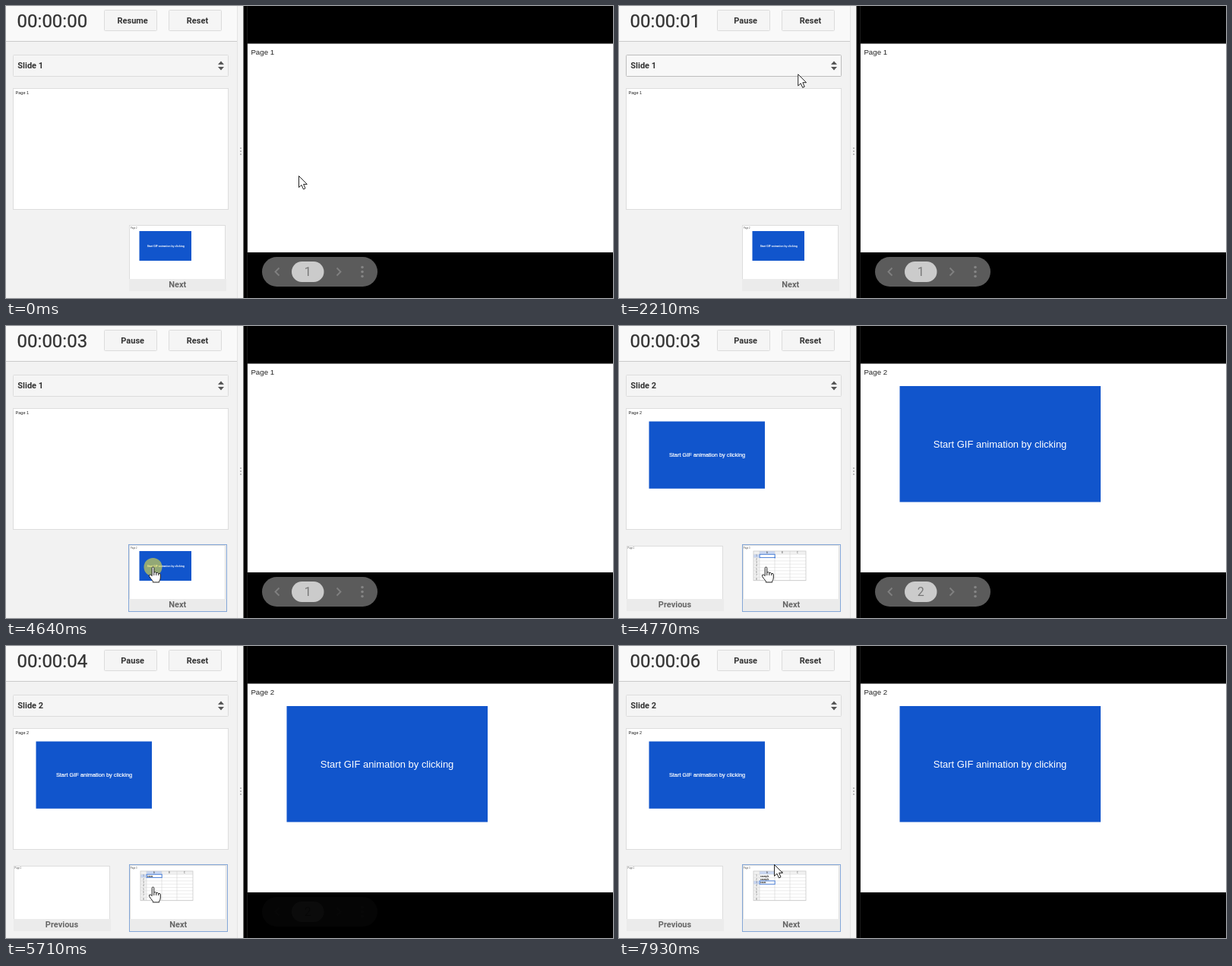
Recreate the animation shown at these times as an HTML page. Size 799 by 384 pixels, loop 8000 ms.

```html
<!DOCTYPE html>
<html lang="en">
<head>
<meta charset="utf-8">
<title>Presenter view</title>
<style>
  html, body { margin: 0; width: 100%; height: 100%; overflow: hidden; background: #000; }
  svg { display: block; width: 799px; height: 384px; }
  text { font-family: "Liberation Sans", Arial, sans-serif; fill: #222; white-space: pre; }
  .ui { font: bold 11px Roboto, sans-serif; fill: #333; }
  .mid { text-anchor: middle; }
  .foot { fill: #666; }
  .clock { font: 24px Roboto, sans-serif; fill: #333; stroke: #333; stroke-width: .25; }
  .box { fill: #f5f5f5; stroke: #dcdcdc; }
  .box.hover { fill: #f8f8f8; stroke: #bdbdbd; }
  .page { fill: #fff; stroke: #ddd; }
  .white { fill: #fff; }
  .tiny { font-size: 2.7px; fill: #444; }
</style>
</head>
<body>
<svg viewBox="0 0 799 384">
  <!-- presenter panel -->
  <rect width="313" height="384" fill="#f2f2f2"/>
  <rect width="305" height="46" fill="#f9f9f9"/>
  <rect y="46" width="305" height="1" fill="#cacaca"/>
  <rect x="305" width="7" height="384" fill="#f4f4f4"/>
  <rect x="304" width="1" height="384" fill="#e4e4e4"/>
  <g fill="#bbb">
    <rect x="308" y="186" width="2" height="2"/>
    <rect x="308" y="190" width="2" height="2"/>
    <rect x="308" y="194" width="2" height="2"/>
  </g>
  <text id="clock" class="clock" x="14.6" y="27.5">00:00:00</text>
  <rect id="toggle" class="box" x="129.5" y="5.5" width="69" height="27" rx="1"/>
  <text id="toggleText" class="ui mid" x="166.7" y="23">Resume</text>
  <rect class="box" x="214.5" y="5.5" width="69" height="27" rx="1"/>
  <text class="ui mid" x="252" y="23">Reset</text>
  <rect id="picker" class="box" x="9.5" y="64.5" width="283" height="28" rx="1"/>
  <text id="pickerText" class="ui" x="15.3" y="82">Slide 1</text>
  <path d="M279 77l4-4.5 4 4.5zM279 80l4 4.5 4-4.5z" fill="#555"/>

  <rect class="page" x="9.5" y="108.5" width="283" height="159"/>
  <text id="previewText" x="12.6" y="116.3" font-size="5.5">Page 1</text>

  <!-- thumbnails -->
  <g id="prev">
    <rect class="page" x="10.5" y="289.5" width="126" height="85" stroke="#e4e4e4"/>
    <rect x="10" y="359" width="128" height="16" fill="#ebebeb"/>
    <text class="tiny" x="11.6" y="292.6">Page 1</text>
    <text class="ui mid foot" x="73.5" y="370">Previous</text>
  </g>
  <g id="next">
    <rect class="page" x="162.5" y="288.5" width="126" height="86" stroke="#e4e4e4"/>
    <rect x="162" y="359" width="128" height="16" fill="#ebebeb"/>
    <rect id="nextEdge" x="161.5" y="287.5" width="129" height="88" fill="none" stroke="#84a7d8"/>
    <text class="ui mid foot" x="225.7" y="370">Next</text>
  </g>
  <text id="nextPage" class="tiny" x="164" y="292.6">Page 2</text>
  <g id="thumbCard">
    <rect x="175.5" y="296" width="68.5" height="39" fill="#1155cc"/>
    <text class="white mid" x="210.3" y="317" font-size="3.35" font-weight="bold" textLength="none">Start GIF animation by clicking</text>
  </g>
  <g id="sheet"></g>

  <!-- audience view -->
  <rect x="312.5" width="487" height="384" fill="#000"/>
  <rect x="317" width="1" height="384" fill="#1c1c1c"/>
  <rect x="318" y="49.5" width="481" height="274.5" fill="#fff"/>
  <text id="stageText" x="322.4" y="64" font-size="9.7">Page 1</text>

  <g id="cards">
    <rect x="39.5" y="125.5" width="152.5" height="88.3" fill="#1155cc"/>
    <text class="white mid" x="116" y="172" font-size="7.4" stroke="#fff" stroke-width=".2">Start GIF animation by clicking</text>
    <rect x="369.5" y="79" width="264.5" height="152.5" fill="#1155cc"/>
    <text class="white mid" x="501.6" y="160" font-size="12.95">Start GIF animation by clicking</text>
  </g>

  <g id="bar">
    <rect x="337" y="330" width="152" height="39" rx="19.5" fill="#5b5b5b"/>
    <rect x="376" y="336" width="42.5" height="27" rx="13.5" fill="#cbcbcb"/>
    <text id="barText" class="mid" x="397.2" y="355.3" font-size="16" style="font-family:Roboto,sans-serif;fill:#777">1</text>
    <path d="M359.5 344.5l-5 5 5 5M435.5 344.5l5 5-5 5" fill="none" stroke="#808080" stroke-width="1.8"/>
    <g fill="#858585">
      <circle cx="469" cy="343.5" r="1.8"/><circle cx="469" cy="349.5" r="1.8"/><circle cx="469" cy="355.5" r="1.8"/>
    </g>
  </g>

  <circle id="ring" r="12" fill="#f2e637" fill-opacity=".58"/>
  <g id="pointer" stroke-linejoin="round" stroke="#222" fill="#fff">
    <path id="arrow" d="M.5 .5V15.6L4 12.4 6.5 18 9 16.8 6.6 11.4H11.3Z"/>
    <path id="hand" d="M-1.3 11.6V1.4Q-1.2 0 0 0T1.3 1.4V7.2Q3.6 5.8 4.3 7.7 6.4 6.6 7.2 8.5 9.6 7.6 9.8 10V14Q9.8 16.6 8.2 18.4V20H-.2V18.4Q-2.6 16-4.8 12.4-5.6 10.6-4.3 10-3.1 9.6-1.3 11.6ZM1.3 7.2V11M4.3 7.7V11M7.2 8.5V11"/>
  </g>
</svg>
<script>
const LOOP = 8000, TICK = 1000 / 15;
const STARTED = 1070, ADVANCED = 4770;
const SECONDS = [2080, 3080, 4110, 5100, 6100, 7110];
const CLICKS = [[940, 1070], [4640, 4770]];
const WORD = "example";
const TYPING = [
  { from: 0, keys: [5370, 5500, 5570, 5710, 5970, 6040, 6170] },
  { from: 6370, keys: [6570, 6640, 6770, 6840, 6970, 7110, 7300] },
  { from: 7500, keys: [7640, 7770, 7840, 7930] }
];
// time, x, y
const PATH = [
  [270, 385, 223], [870, 165, 13], [1150, 165, 13], [1400, 232, 88],
  [2070, 232, 88], [2470, 242, 92], [2810, 242, 92], [3067, 221, 183],
  [3530, 196, 303], [3670, 193.5, 317], [7530, 193.5, 317], [7930, 204, 287]
];

const SVG = "http://www.w3.org/2000/svg";
const el = {};
document.querySelectorAll("[id]").forEach(n => el[n.id] = n);

function add(parent, tag, attrs) {
  const node = document.createElementNS(SVG, tag);
  for (const k in attrs) node.setAttribute(k, attrs[k]);
  return parent.appendChild(node);
}
const show = (node, on) => node.style.display = on ? "" : "none";
const passed = (list, t) => list.filter(k => t >= k).length;

// spreadsheet thumbnail
const ROW = 4.3, rowTop = i => 300.3 + i * ROW;
add(el.sheet, "rect", { x: 177, y: 296, width: 69, height: 4.3, fill: "#f1f1f1" });
add(el.sheet, "rect", { x: 177, y: 296, width: 8, height: 38.5, fill: "#f1f1f1" });
add(el.sheet, "rect", { x: 185, y: 296, width: 20, height: 4.3, fill: "#c9d7f2" });
const rowMark = add(el.sheet, "rect", { x: 177, width: 8, height: ROW, fill: "#c9d7f2" });
for (let i = 0; i < 9; i++)
  add(el.sheet, "path", { d: `M177 ${rowTop(i)}H246`, stroke: "#d9d9d9", "stroke-width": .5 });
for (const x of [185, 205, 225])
  add(el.sheet, "path", { d: `M${x} 296V334.7`, stroke: "#d5d5d5", "stroke-width": .6 });
add(el.sheet, "rect", { x: 177, y: 296, width: 69, height: 38.7, fill: "none", stroke: "#c4c4c4", "stroke-width": .7 });
["A", "B", "C"].forEach((s, i) =>
  add(el.sheet, "text", { class: "tiny mid", x: 195 + 20 * i, y: 299.2 }).textContent = s);
for (let i = 0; i < 8; i++)
  add(el.sheet, "text", { class: "tiny mid", x: 181, y: rowTop(i) + 3.1 }).textContent = i + 1;
const cells = TYPING.map((_, i) =>
  add(el.sheet, "text", { x: 185.9, y: rowTop(i) + 3.2, "font-size": 2.9, "font-weight": "bold" }));
const cursorCell = add(el.sheet, "rect", { x: 185.2, width: 20, height: ROW, fill: "none", stroke: "#3f78d8", "stroke-width": .9 });
const cellGrip = add(el.sheet, "rect", { x: 204.5, width: 1.5, height: 1.5, fill: "#3f78d8" });

function pointerAt(t) {
  let i = PATH.findIndex(p => p[0] > t);
  if (i === 0) return PATH[0].slice(1);
  if (i < 0) return PATH[PATH.length - 1].slice(1);
  const [t0, x0, y0] = PATH[i - 1], [t1, x1, y1] = PATH[i];
  const k = (t - t0) / (t1 - t0);
  return [x0 + (x1 - x0) * k, y0 + (y1 - y0) * k];
}

function drawSheet(t) {
  const active = passed(TYPING.map(r => r.from), t) - 1;
  TYPING.forEach((row, i) => cells[i].textContent = WORD.slice(0, passed(row.keys, t)));
  const y = rowTop(active);
  rowMark.setAttribute("y", y);
  cursorCell.setAttribute("y", y);
  cellGrip.setAttribute("y", y + ROW - .8);
  show(cellGrip, passed(TYPING[active].keys, t) === 0);
}

function draw(t) {
  const second = t >= ADVANCED, page = second ? 2 : 1;
  const [x, y] = pointerAt(Math.floor((t + 4) / TICK) * TICK);

  el.clock.textContent = "00:00:0" + passed(SECONDS, t);
  el.toggleText.textContent = t < STARTED ? "Resume" : "Pause";
  el.pickerText.textContent = "Slide " + page;
  el.previewText.textContent = el.stageText.textContent = "Page " + page;
  el.nextPage.textContent = "Page " + (page + 1);
  el.barText.textContent = page;

  for (const n of [el.prev, el.cards, el.sheet]) show(n, second);
  show(el.thumbCard, !second);
  el.next.setAttribute("transform", `translate(${second ? 1 : 0})`);
  if (second) drawSheet(t);

  const fade = t < 5370 ? 1 : Math.max(0, (5735 - t) / 430);
  el.bar.setAttribute("opacity", fade);

  el.toggle.classList.toggle("hover", x > 129 && x < 199 && y < 33);
  el.picker.classList.toggle("hover", x > 9 && x < 292 && y > 64 && y < 92);
  const onNext = x > 162 && x < 291 && y > 286;
  show(el.nextEdge, onNext);

  const hand = onNext && y > 288;
  show(el.hand, hand);
  show(el.arrow, !hand);
  el.pointer.setAttribute("transform", `translate(${x} ${y})`);
  show(el.ring, CLICKS.some(([a, b]) => t >= a && t < b));
  el.ring.setAttribute("cx", x);
  el.ring.setAttribute("cy", y);
}

const start = performance.now();
function frame() {
  draw((performance.now() - start) % LOOP);
  requestAnimationFrame(frame);
}
draw(0);
requestAnimationFrame(frame);
</script>
</body>
</html>
```
